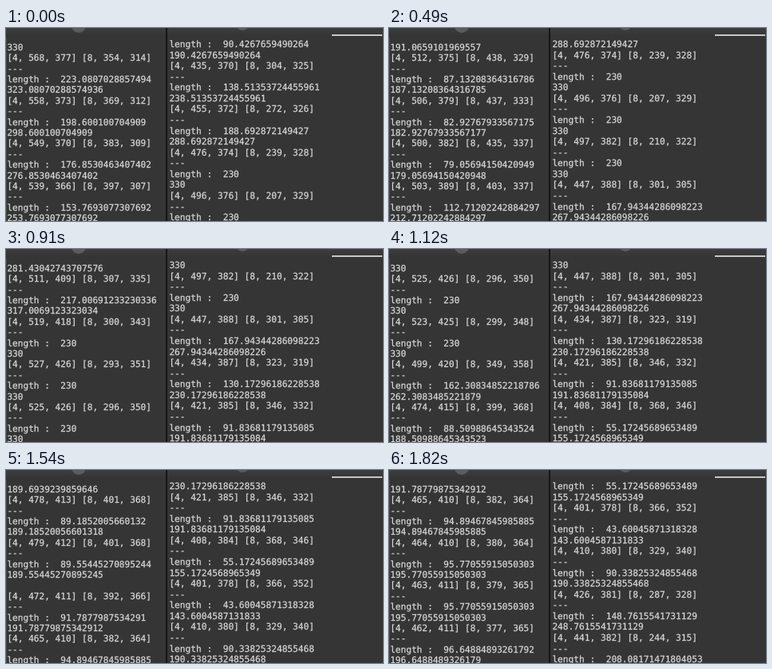
These frames come from a looping animation (472x242 px, 1890 ms). An HTML page:

```html
<!DOCTYPE html>
<html lang="en">
<head>
<meta charset="utf-8">
<title>Distance logs</title>
<style>
  html, body { margin: 0; width: 100%; height: 100%; overflow: hidden; background: #353535; }
  .stage { position: relative; width: 472px; height: 242px; overflow: hidden; background: #353535; }
  .stage > * { position: absolute; margin: 0; }
  .bar { left: 0; top: 0; width: 472px; height: 10px; background: linear-gradient(#3d3d3d, #353535); }
  .dot { width: 18px; height: 18px; border-radius: 50%; background: #5c5c5c; }
  .edge { left: 0; top: 12px; width: 1px; height: 230px; background: #43504a; }
  .gap { left: 200px; top: 0; width: 2px; height: 242px; background: #161616; }
  .rule { left: 408px; top: 8px; width: 63px; height: 2px; background: #c6c6c6; }
  pre {
    color: #d6d6d6;
    font-family: "DejaVu Sans Mono", "Noto Sans Mono", monospace;
    text-rendering: geometricPrecision;
    -webkit-text-stroke: .25px #d6d6d6;
  }
  #left { left: 1.4px; top: 17.7px; font-size: 11.12px; line-height: 13.4px; }
  #right { left: 204.4px; top: 14.1px; font-size: 11.18px; line-height: 13.56px; }
</style>
</head>
<body>
<div class="stage">
  <div class="bar"></div>
  <div class="dot" style="left:82px;top:-12px"></div>
  <div class="dot" style="left:287px;top:-15px"></div>
  <div class="edge"></div>
  <div class="gap"></div>
  <div class="rule"></div>
  <pre id="left"></pre>
  <pre id="right"></pre>
</div>
<script>
  const LOOP = 1890, STEP = 70, ROWS = 17;

  // Key poses of the tracked hand: reading number, then x, y of points 4 and 8
  const leftKeys = [
    [0, 577, 380, 340, 316], [4, 539, 366, 397, 307], [7, 518, 372, 440, 325],
    [10, 500, 382, 435, 337], [14, 511, 409, 307, 335], [16, 527, 426, 293, 351],
    [18, 523, 425, 299, 348], [20, 474, 415, 399, 368], [24, 479, 412, 401, 368],
    [26, 465, 410, 382, 364], [29, 462, 411, 377, 365]
  ];
  const rightKeys = [
    [1, 435, 370, 304, 325], [4, 496, 376, 207, 329], [5, 497, 382, 210, 322],
    [6, 447, 388, 301, 305], [9, 408, 384, 368, 346], [10, 401, 378, 366, 352],
    [11, 410, 380, 329, 340], [13, 441, 382, 244, 315]
  ];

  // Straight-line motion between the key poses around reading n
  function poseAt(keys, n) {
    const next = Math.max(1, keys.findIndex(key => key[0] >= n));
    const [from, ...a] = keys[next - 1];
    const [to, ...b] = keys[next];
    return a.map((v, i) => Math.round(v + (b[i] - v) * (n - from) / (to - from)));
  }

  // Four lines per reading, with an optional blank line before one of them
  function makeLog(keys, blankBefore) {
    const lines = [];
    const last = keys[keys.length - 1][0];
    for (let n = 0; n <= last; n++) {
      const [ax, ay, bx, by] = poseAt(keys, n);
      const length = Math.min(230, Math.sqrt((ax - bx) ** 2 + (ay - by) ** 2));
      if (n === blankBefore) lines.push("");
      lines.push(
        `[4, ${ax}, ${ay}] [8, ${bx}, ${by}]`,
        "---",
        `length :  ${length}`,
        `${length + 100}`
      );
    }
    return lines;
  }

  const BLANK = 25;

  // About one reading per step; now and then its last line is still missing
  function leftEnd(step) {
    const n = Math.floor(4.9 + step * 25 / 26);
    return 4 * (n + 1) + (n >= BLANK ? 1 : 0) - (step % 13 === 9 ? 1 : 0);
  }

  // A steady flow of lines that never stops between a pose and its length
  function rightEnd(step) {
    const line = Math.floor(18 + step * 18 / 13);
    const part = line % 4;
    return part < 2 ? line - part : line + 1;
  }

  const panes = [
    { el: document.getElementById("left"), lines: makeLog(leftKeys, BLANK), endAt: leftEnd },
    { el: document.getElementById("right"), lines: makeLog(rightKeys), endAt: rightEnd }
  ];

  let shown = -1;

  function draw(time) {
    const step = Math.floor((time % LOOP) / STEP);
    if (step !== shown) {
      shown = step;
      for (const { el, lines, endAt } of panes) {
        const end = endAt(step);
        el.textContent = lines.slice(end - ROWS, end).join("\n");
      }
    }
    requestAnimationFrame(draw);
  }

  draw(0);
</script>
</body>
</html>
```
